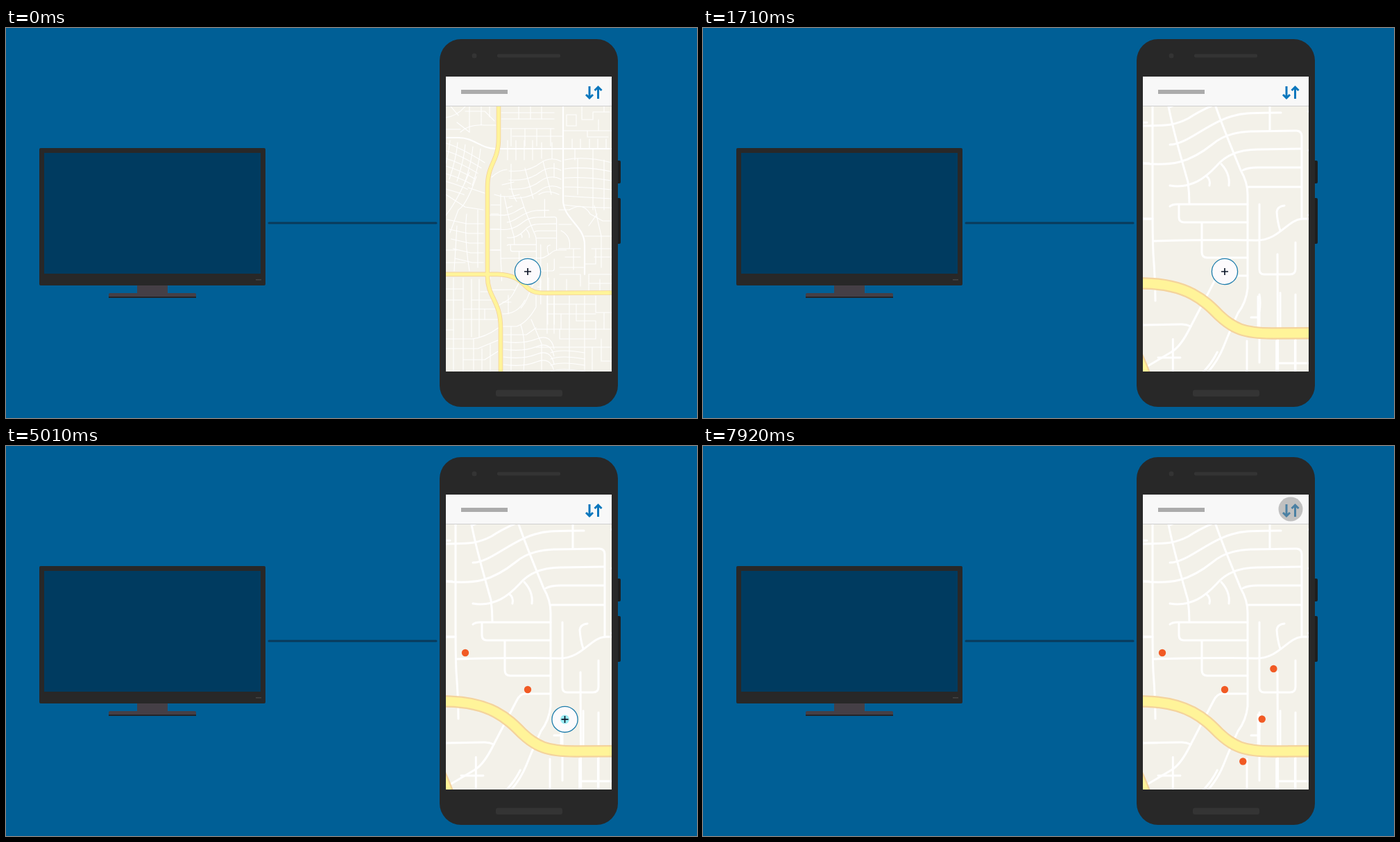
Animation of 996x562 px, one loop 8000 ms. Source, as an HTML page:

```html
<!DOCTYPE html>
<html lang="en">
<head>
<meta charset="utf-8">
<title>Map collection</title>
<style>
html, body { margin: 0; width: 100%; height: 100%; overflow: hidden; background: #005f96; }
svg { display: block; width: 100%; height: 100%; }
.roads path { fill: none; stroke: #fff; stroke-linecap: round; stroke-linejoin: round; }
#near { stroke-width: 3; }
#far { stroke-width: 1.1; }
#far .main { stroke-width: 2.2; }
#yellow path { fill: none; }
</style>
</head>
<body>
<svg viewBox="0 0 996 562">
  <defs><clipPath id="view"><rect x="634" y="113" width="239" height="382"/></clipPath></defs>
  <rect width="996" height="562" fill="#005f96"/>

  <g id="monitor">
    <rect x="48" y="173" width="326" height="198" rx="2" fill="#282828"/>
    <rect x="55" y="180" width="312" height="174" fill="#003b60"/>
    <rect x="360" y="362" width="8" height="1.5" fill="#444"/>
    <rect x="189" y="371" width="44" height="12" fill="#453f46"/>
    <path d="M148 389V384Q148 382 150 382H272Q274 382 274 384V389Z" fill="#453f46"/>
    <rect x="148" y="387" width="126" height="2" fill="#242428"/>
  </g>
  <path d="M379 281H620" stroke="#0a3a5b" stroke-width="3" stroke-linecap="round"/>

  <g id="phone">
    <rect x="876" y="191" width="10" height="33" rx="2" fill="#1e1e1e"/>
    <rect x="876" y="245" width="10" height="66" rx="2" fill="#1e1e1e"/>
    <rect x="625" y="16" width="257" height="530" rx="31" fill="#282828"/>
    <circle cx="675" cy="40" r="3.5" fill="#343434"/>
    <rect x="708" y="37.5" width="91" height="5" rx="2" fill="#343434"/>
    <rect x="706" y="521.5" width="96" height="9.5" rx="3" fill="#343434"/>
    <rect x="634" y="70" width="239" height="43" fill="#f8f8f8"/>
    <rect x="656" y="89" width="67" height="6" fill="#ababab"/>
  </g>

  <g clip-path="url(#view)">
    <rect x="634" y="113" width="239" height="382" fill="#f3f1e9"/>
    <g id="map">
      <g class="roads" id="far" transform="translate(752 347) scale(2.667) translate(-752 -347)"></g>
      <g class="roads" id="near"></g>
      <g id="yellow"></g>
    </g>
    <g id="dots"></g>
    <g id="pin">
      <circle r="18.6" fill="#fcfafc" stroke="#1c7cab" stroke-width="1.3"/>
      <circle id="glow" r="6.5" fill="#9cecf5"/>
      <path d="M-5 0H5M0 -5V5" stroke="#10182a" stroke-width="1.7"/>
    </g>
  </g>
  <path d="M634 112.5H873" stroke="#cfcfcf"/>
  <path d="M841 84V101M836 96L841 101L846 96M853.5 102V85M848.5 90L853.5 85L858.5 90"
        fill="none" stroke="#0a77bd" stroke-width="3"/>
  <circle id="tap" cx="847" cy="91" r="17.5" fill="#8a8a8a"/>
</svg>

<script>
const LOOP = 8000;
const $ = id => document.getElementById(id);
const clamp = x => Math.max(0, Math.min(1, x));
const span = (t, start, len) => clamp((t - start) / len);
const smooth = x => x * x * (3 - 2 * x);
const easeOut = x => 1 - (1 - x) * (1 - x);

function add(parent, tag, attrs) {
  const el = document.createElementNS('http://www.w3.org/2000/svg', tag);
  for (const k in attrs) el.setAttribute(k, attrs[k]);
  parent.append(el);
  return el;
}
const road = (id, d, cls = '') => add($(id), 'path', { d, class: cls });
const cols = (xs, y1, y2) => xs.map(x => `M${x} ${y1}V${y2}`).join('');
const rows = (ys, x1, x2) => ys.map(y => `M${x1} ${y}H${x2}`).join('');
// the same path repeated with a fixed offset
const repeat = (n, dx, dy, make) =>
  Array.from({ length: n }, (_, i) => make(i * dx, i * dy)).join('');

// streets around the point where the view zooms in
[
  'M648 60V262Q648 300 649 325Q652 365 652 393',
  'M662 70L671 113C678 150 690 190 699 222Q701 238 701 253',
  'M725 70L739 113C752 150 765 180 775 205Q785 222 785 240V375Q783 395 771 411Q760 435 750 460Q742 480 726 498',
  'M600 141H634C660 140 675 143 700 130Q715 120 738 110',
  'M672 114L692 106M673 168C702 168 735 126 785 123Q800 122 833 122',
  'M600 195H634C675 199 700 195 735 167Q755 150 790 149L855 148Q863 148 863 156V275',
  'M817 80V147M673 227C705 232 725 215 740 199Q760 175 800 175L862 174',
  'M725 213Q732 218 730 227M747 196Q760 210 758 227',
  'M778 205Q785 201 800 201H862M786 229H862',
  'M673 257Q676 254 684 254H785M686 254V273Q686 280 694 280H785',
  'M600 275H648M649 307C690 306 750 305 798 306C830 306 842 277 863 275H900',
  'M719 281V323Q719 331 727 331H785',
  'M785 357H748Q741 357 736 367L703 430Q689 459 675 467L638 489',
  'M600 428H634L690 427Q697 427 703 430',
  'M802 254V348Q802 355 809 355H846Q854 355 854 347V309',
  'M838 256Q828 257 827 265Q828 280 832 292',
  'M828 326L829 560M790 417H802M802 384Q804 395 802 410V482M854 384V560'
].forEach(d => road('near', d));

// wider neighbourhood, at the starting scale
[
  'M630 158H652C675 158 684 174 706 174H880',
  'M803 105V248C803 275 834 285 834 312V355'
].forEach(d => road('far', d, 'main'));
[
  'M634 129Q650 127 662 113M641 113L652 126M634 146H655M662 120H690L704 134M668 113V150',
  'M655 150Q668 138 690 140H706M685 113V140M697 113V128M650 136L668 150',
  rows([122, 131, 145], 714, 790) + rows([156], 730, 803),
  cols([739, 756, 772], 113, 131) + cols([728, 748, 765, 785], 145, 170),
  'M808 125H822V141H808ZM830 113V132H846V121H870M803 148H873M838 148V157H868M854 132V148M862 113V121',
  cols([723, 735, 747, 759], 162, 190) + cols([772, 787], 165, 188),
  cols([816, 828, 841, 853, 865], 160, 174) + cols([820, 846], 174, 190),
  repeat(6, 2, 13, (x, y) => `M805 ${190 + y}Q835 ${184 + y + x} 873 ${194 + y}`),
  cols([824], 188, 240) + cols([846, 862], 190, 262),
  'M812 262Q832 250 842 268L860 278H873M848 256L858 300M834 300H873M840 285L852 268M844 318H873M858 300V345',
  'M848 330H873M834 340H850V318M840 355H873',
  // hillside streets on the left
  repeat(7, 0, 11, (x, y) => `M634 ${166 + y}Q655 ${172 + y} ${690 - y * .45} ${194 + y * .7}`),
  repeat(5, 11, 3, (x, y) => `M${640 + x} ${162 + y}Q${638 + x} ${185 + y} ${628 + x} ${215 + y}`),
  'M668 208Q650 250 634 270M678 214Q664 255 652 262L640 295M634 240L662 258L688 262M690 238L666 230',
  repeat(5, 0, 14, (x, y) => `M${636 + y / 5} ${276 + y}L${664 + y / 7} ${282 + y}H688`),
  'M664 268Q660 300 668 350M680 262V345M650 285L646 350M634 320H650M634 338H662',
  // curved streets above the centre
  repeat(4, 0, 13, (x, y) => `M725 ${206 + y}Q752 ${208 + y} 768 ${196 + y}T800 ${192 + y}`),
  'M728 196V215Q726 235 736 250M748 202L760 246M774 192L786 240M715 226L732 222M704 240Q720 246 740 240',
  'M768 240Q780 232 797 240M790 195V215M700 215Q712 204 722 204M699 255H712M699 268H710M699 290H711M700 320H712',
  'M797 262H812M797 283H815M800 292Q815 300 812 318M797 318H828M806 330H828M818 318V348M798 345H834',
  // lower left
  cols([645, 659], 360, 495) + cols([671, 682], 362, 445),
  rows([420], 634, 710) + rows([376, 392], 634, 659) + rows([405], 659, 705),
  'M634 448H672Q690 446 710 432M634 462H680L709 450M659 478H690L709 466M674 448V495M686 462V495M698 456V495',
  'M698 362V350M684 380H700M671 392H702M690 405V420M634 435H645',
  // lower right
  'M764 386V402Q752 424 736 430H716M716 412Q738 412 748 392M724 385V412M716 395H728',
  repeat(4, 0, 11, (x, y) => `M717 ${452 + y}Q745 ${456 + y} 765 ${448 + y}T790 ${462 + y}`),
  'M728 430V495M742 428Q750 450 746 495M757 420L772 455V495M717 442H750L764 432',
  cols([780, 790], 386, 440) + cols([812, 834], 386, 495),
  rows([398, 412], 780, 850) + rows([434, 460], 764, 873),
  'M800 412V434M822 398V422H850V448H798V434M850 386V410H873M862 410V434M845 460V495M858 448V480H873',
  repeat(4, 0, 9, (x, y) => `M785 ${468 + y}Q800 ${462 + y} 834 ${468 + y}`),
  'M798 355H828V372M808 362V382M840 355V382M856 362V382M840 368H873M770 362V378M782 360V380'
].forEach(d => road('far', d));

// main yellow roads: casing first, then the fill
const at = (x, y) => `${752 + (x - 752) * 2.667} ${347 + (y - 347) * 2.667}`;
const highways = [
  `M${at(710, 100)}L${at(710, 158)}C${at(710, 194)} ${at(694, 194)} ${at(694, 230)}L${at(694, 358)}` +
    `C${at(694, 388)} ${at(713, 393)} ${at(713, 432)}L${at(713, 510)}`,
  'M420 368H636C700 369 724 394 744 414C764 433 780 440 820 440L1090 439'
];
for (const [stroke, width] of [['#f4d39c', 17.5], ['#fff499', 13]])
  for (const d of highways) add($('yellow'), 'path', { d, stroke, 'stroke-width': width });

// pin stops: x, y, time of leaving
const stops = [
  [752, 351, 3165],
  [662, 298, 4080],
  [805.7, 393.5, 4995],
  [778.3, 454.5, 5910],
  [822.4, 321, 6825]
];
const MOVE = 330, DOT_DELAY = 480, DOT_GROW = 220;
const dots = stops.map(([cx, cy]) => [
  add($('dots'), 'circle', { cx, cy, fill: '#4f8f8c' }),
  add($('dots'), 'circle', { cx, cy, fill: '#f15a24' })
]);

function pinAt(t) {
  let [x, y] = stops[0];
  for (let i = 1; i < stops.length; i++) {
    const p = smooth(span(t, stops[i - 1][2], MOVE));
    x += (stops[i][0] - stops[i - 1][0]) * p;
    y += (stops[i][1] - stops[i - 1][1]) * p;
  }
  return [x, y];
}

function draw(t) {
  const zoom = .375 + .625 * smooth(span(t, 0, 960));
  $('map').setAttribute('transform', `translate(752 347) scale(${zoom}) translate(-752 -347)`);

  const [x, y] = pinAt(t);
  $('pin').setAttribute('transform', `translate(${x} ${y})`);
  $('pin').setAttribute('opacity', 1 - span(t, 6840, 270));
  $('glow').setAttribute('r', 6.5 * easeOut(span(t, 1650, 500)));

  dots.forEach(([halo, dot], i) => {
    const p = span(t, stops[i][2] + DOT_DELAY, DOT_GROW);
    const r = 5.2 * easeOut(p);
    dot.setAttribute('r', r * (.85 + .15 * p));
    halo.setAttribute('r', r);
    halo.setAttribute('opacity', 1 - p);
  });

  const press = easeOut(span(t, 7620, 270));
  $('tap').setAttribute('r', 17.5 * press);
  $('tap').setAttribute('opacity', .5 * press);
}

const begin = performance.now();
function tick() {
  draw((performance.now() - begin) % LOOP);
  requestAnimationFrame(tick);
}
draw(0);
requestAnimationFrame(tick);
</script>
</body>
</html>
```
